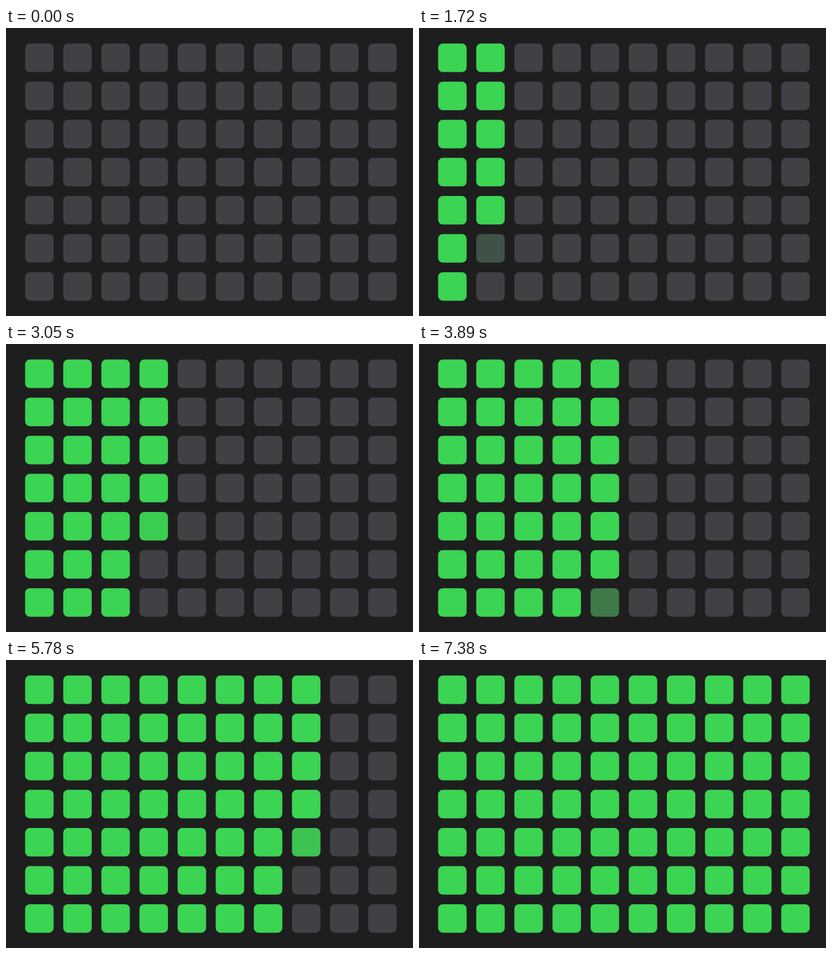
Animation, 688 px wide and 487 px high, one loop 7.51 s. Source, as an HTML page with a canvas:

```html
<!DOCTYPE html>
<html lang="en">
<head>
<meta charset="utf-8">
<title>Filling grid</title>
<style>
  html, body { margin: 0; width: 100%; height: 100%; overflow: hidden; background: #1e1e1f; }
  canvas { display: block; }
</style>
</head>
<body>
<canvas width="688" height="487"></canvas>
<script>
const ctx = document.querySelector('canvas').getContext('2d');
const COLS = 10, ROWS = 7, PITCH = 64.44, SIZE = 48.2, RADIUS = 8;
const LEFT = 32.3, TOP = 26.3;
const LOOP = 7510, FIRST = 600, STEP = 70, RESYNC = 6680;
const FILL_START = 522, CELL_TIME = 97.8;
const GREY = [64, 64, 69], GREEN = [59, 212, 83];

const ease = x => x < 0.5 ? 2 * x * x : 1 - 2 * (1 - x) ** 2;
const clamp = x => Math.min(1, Math.max(0, x));
const mix = p => `rgb(${GREY.map((c, i) => Math.round(c + (GREEN[i] - c) * p))})`;

// The picture holds between ticks of STEP ms
function tick(t) {
  if (t < FIRST) return 0;
  const base = t < RESYNC ? FIRST : RESYNC;
  return base + Math.floor((t - base) / STEP) * STEP;
}

function draw(now) {
  const filled = (tick(now % LOOP) - FILL_START) / CELL_TIME;
  ctx.fillStyle = '#1e1e1f';
  ctx.fillRect(0, 0, 688, 487);
  for (let i = 0; i < COLS * ROWS; i++) {
    const col = Math.floor(i / ROWS), row = i % ROWS;
    ctx.fillStyle = mix(ease(clamp(filled - i)));
    ctx.beginPath();
    ctx.roundRect(LEFT + col * PITCH, TOP + row * PITCH, SIZE, SIZE, RADIUS);
    ctx.fill();
  }
}

const start = performance.now();
function loop() {
  draw(performance.now() - start);
  requestAnimationFrame(loop);
}
loop();
</script>
</body>
</html>
```
